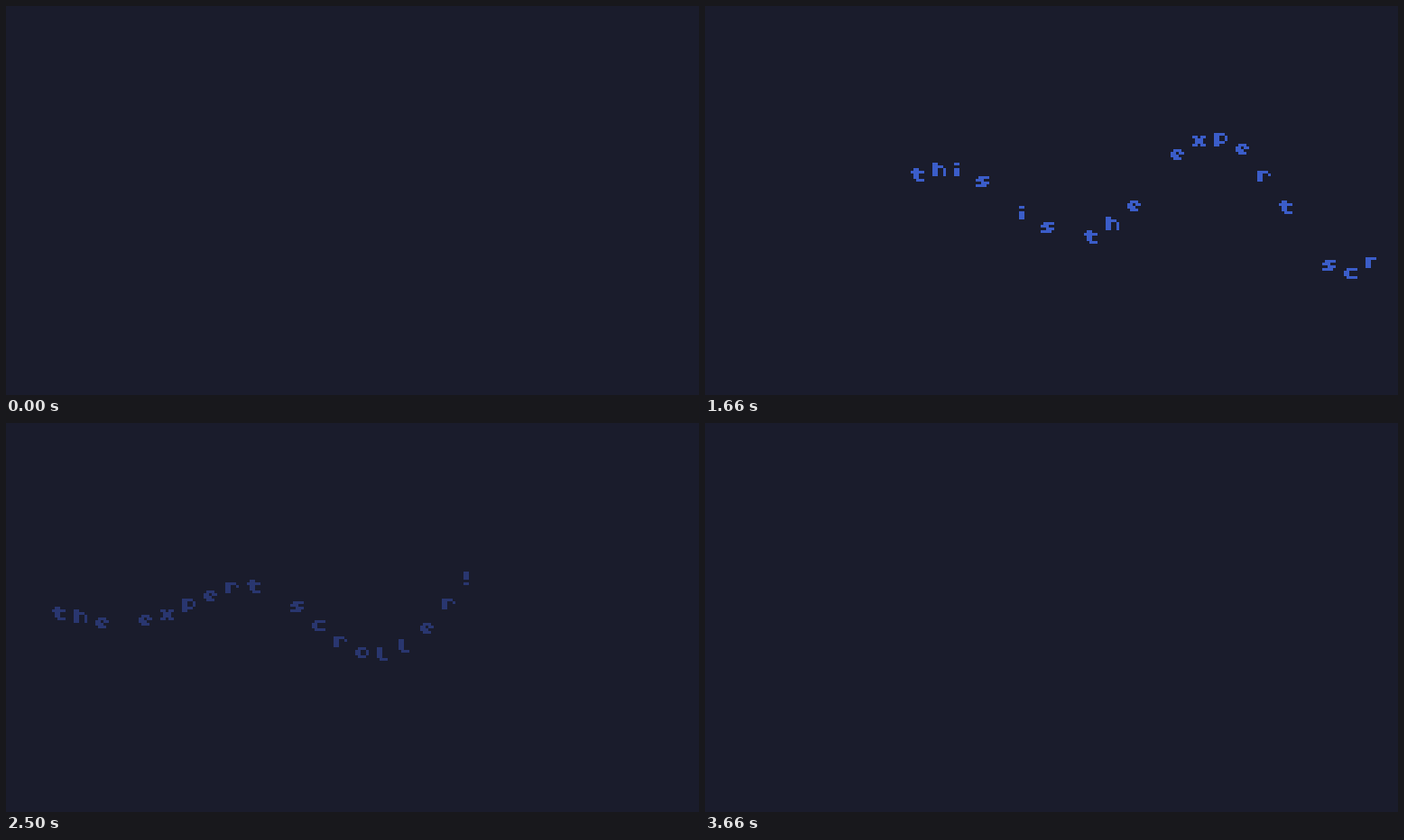
Write an HTML page with a canvas that moves like this. It is 768 px wide and 432 px high and loops after 3900 ms.

```html
<!DOCTYPE html>
<html lang="en">
<head>
<meta charset="utf-8">
<title>Sine scroller</title>
<style>
  html, body { margin: 0; width: 100%; height: 100%; overflow: hidden; background: #1a1c2c; }
  canvas { display: block; }
</style>
</head>
<body>
<canvas width="768" height="432"></canvas>
<script>
const LOOP = 3900, STEP = 20, START = 400;
const WIDTH = 240, HEIGHT = 136, SCALE = 3;
const MESSAGE = 'this is the expert scroller!';
const PALETTE = ('1a1c2c 5d275d b13e53 ef7d57 ffcd75 a7f070 38b764 257179 ' +
  '29366f 3b5dc9 41a6f6 73eff7 f4f4f4 94b0c2 566c86 333c57').split(' ');

// Pixel rows from the ascender line down to the descender line.
const GLYPHS = {
  t: '.XX.. XXXXX .XX.. .XX.. ..XXX',
  h: 'XX... XXXX. XX..X XX..X XX..X',
  i: 'XX .. XX XX XX',
  s: '..... .XXXX XXX.. ..XXX XXXX.',
  e: '..... .XXX. XX.XX XXX.. .XXX.',
  x: '..... XX.XX .XXX. .XXX. XX.XX',
  p: '..... XXXX. XX..X XX..X XXXX. XX...',
  r: '..... XXXX. XX..X XX... XX...',
  c: '..... .XXXX XX... XX... .XXXX',
  o: '..... .XXX. XX..X XX..X .XXX.',
  l: 'XX.. XX.. XX.. XX.. .XXX',
  '!': 'XX XX XX .. XX'
};

const ctx = document.querySelector('canvas').getContext('2d');
ctx.setTransform(SCALE, 0, 0, SCALE, 24, 12);
ctx.beginPath();
ctx.rect(0, 0, WIDTH, HEIGHT);
ctx.clip();

function drawGlyph(char, left, top) {
  (GLYPHS[char] || '').split(' ').forEach((row, y) => {
    [...row].forEach((cell, x) => {
      if (cell === 'X') ctx.fillRect(left + x, top + y, 1, 1);
    });
  });
}

function draw(ms) {
  const time = Math.floor(ms / STEP) * STEP;
  const tick = Math.floor((time - START) * 0.06 + 1e-6); // 60 ticks per second

  // Summed on purpose: rounding decides on which tick the colour flips.
  let clock = 0;
  for (let k = 0; k < tick + 10; k++) clock += 0.1;

  ctx.fillStyle = '#' + PALETTE[0];
  ctx.fillRect(0, 0, WIDTH, HEIGHT);
  ctx.fillStyle = '#' + PALETTE[Math.floor(clock * 3) % 16];
  [...MESSAGE].forEach((char, i) => {
    const x = 248 + i * 8 - tick * 2.4;
    const y = 64 + x / 8 * Math.sin(x / 16);
    drawGlyph(char, Math.trunc(x), Math.trunc(y));
  });
}

const origin = performance.now();
function loop() {
  draw((performance.now() - origin) % LOOP);
  requestAnimationFrame(loop);
}
loop();
</script>
</body>
</html>
```
